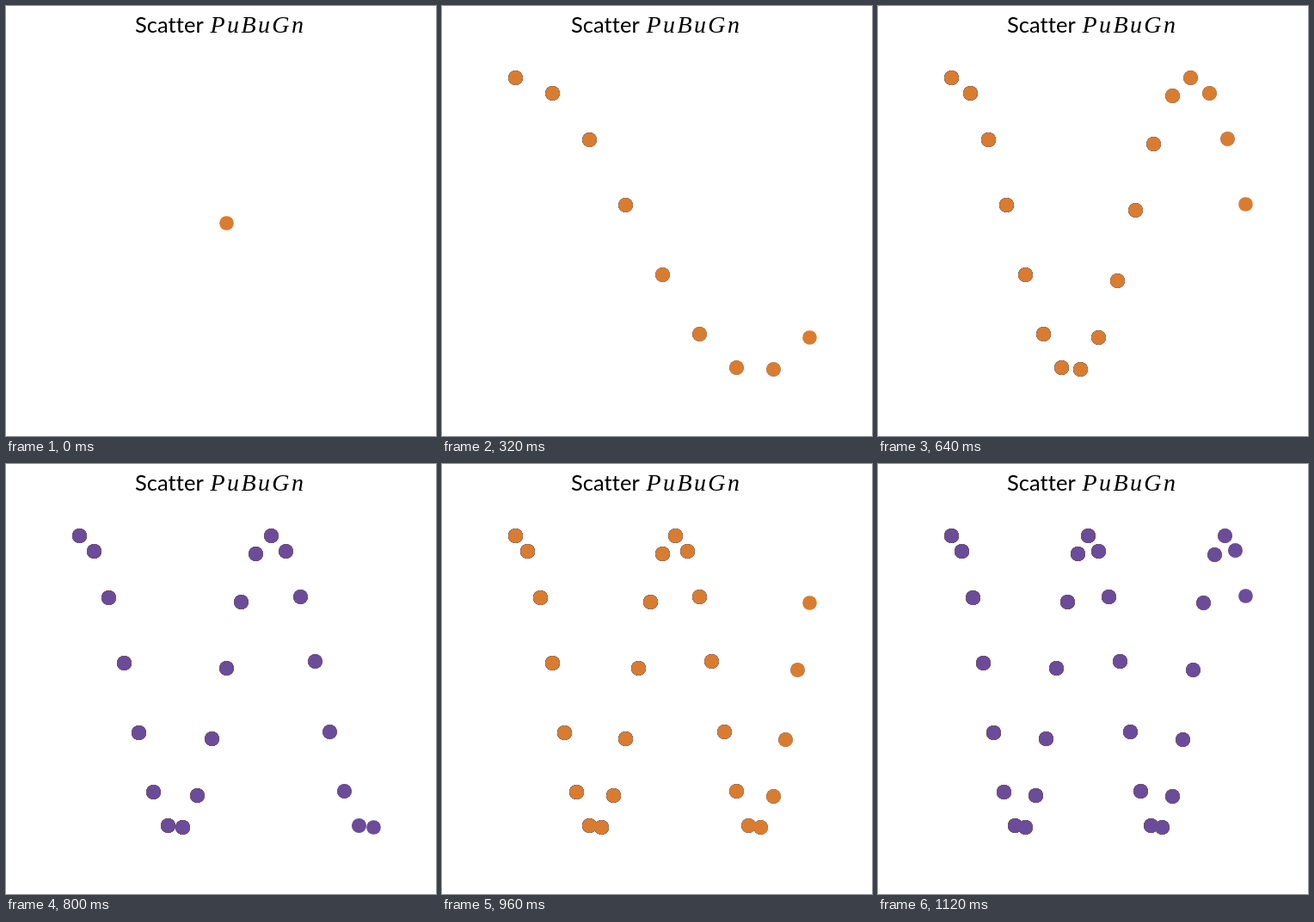
An HTML page with a canvas for the animation above (1160 ms loop, 500 by 500 pixels).

```html
<!DOCTYPE html>
<html lang="en">
<head>
<meta charset="utf-8">
<title>Scatter PuBuGn</title>
<style>
html, body { margin: 0; width: 100%; height: 100%; overflow: hidden; background: #fff; }
canvas { display: block; width: 500px; height: 500px; }
</style>
</head>
<body>
<canvas id="stage" width="500" height="500"></canvas>
<script>
const ctx = document.getElementById('stage').getContext('2d');
const STEP = 40, COUNT = 29, RADIUS = 8.33;
const BOX = { left: 85.2, right: 427.3, top: 83, bottom: 422 };
const COLORS = ['#396ab1', '#da7c30', '#3e9651', '#cc2529',
                '#535154', '#6b4c9a', '#922428', '#948b3d'];

const wave = i => Math.cos(i * 14 / 29 - 0.016);
const values = Array.from({ length: COUNT }, (_, i) => wave(i));
const snap = v => Math.round(v) + 0.5;

// Axes always fit the points seen so far.
function layout(last) {
  const seen = values.slice(0, last + 1);
  const hi = Math.max(...seen), lo = Math.min(...seen);
  return seen.map((v, i) => {
    const u = last ? i / last : 0.5;
    const w = last ? (hi - v) / (hi - lo) : 0.5;
    return {
      x: snap(BOX.left + u * (BOX.right - BOX.left)),
      y: snap(BOX.top + w * (BOX.bottom - BOX.top) - 0.1)
    };
  });
}

function dot(p, color) {
  ctx.fillStyle = color;
  ctx.beginPath();
  ctx.arc(p.x, p.y, RADIUS, 0, Math.PI * 2);
  ctx.fill();
}

function label(text, x, font, spacing) {
  ctx.font = font;
  ctx.letterSpacing = spacing + 'px';
  ctx.fillText(text, x, 31);
}

function title() {
  ctx.fillStyle = '#000';
  ctx.textBaseline = 'alphabetic';
  // Any letter spacing also turns off the tt ligature.
  label('Scatter', 150, '25.5px Lato, "Open Sans", sans-serif', 0.05);
  label('PuBuGn', 237.5, 'italic 28px "Liberation Serif", serif', 2.4);
}

function draw(last) {
  ctx.fillStyle = '#fff';
  ctx.fillRect(0, 0, 500, 500);
  title();
  const points = layout(last);
  // Each new series repeats the earlier points on top of the old ones.
  for (let s = 0; s <= last; s++) {
    const color = COLORS[(s + 1) % COLORS.length];
    for (let i = 0; i <= s; i++) dot(points[i], color);
  }
}

const start = performance.now();
function tick() {
  const t = performance.now() - start;
  draw(Math.floor(t / STEP) % COUNT);
  requestAnimationFrame(tick);
}
draw(0);
requestAnimationFrame(tick);
</script>
</body>
</html>
```
